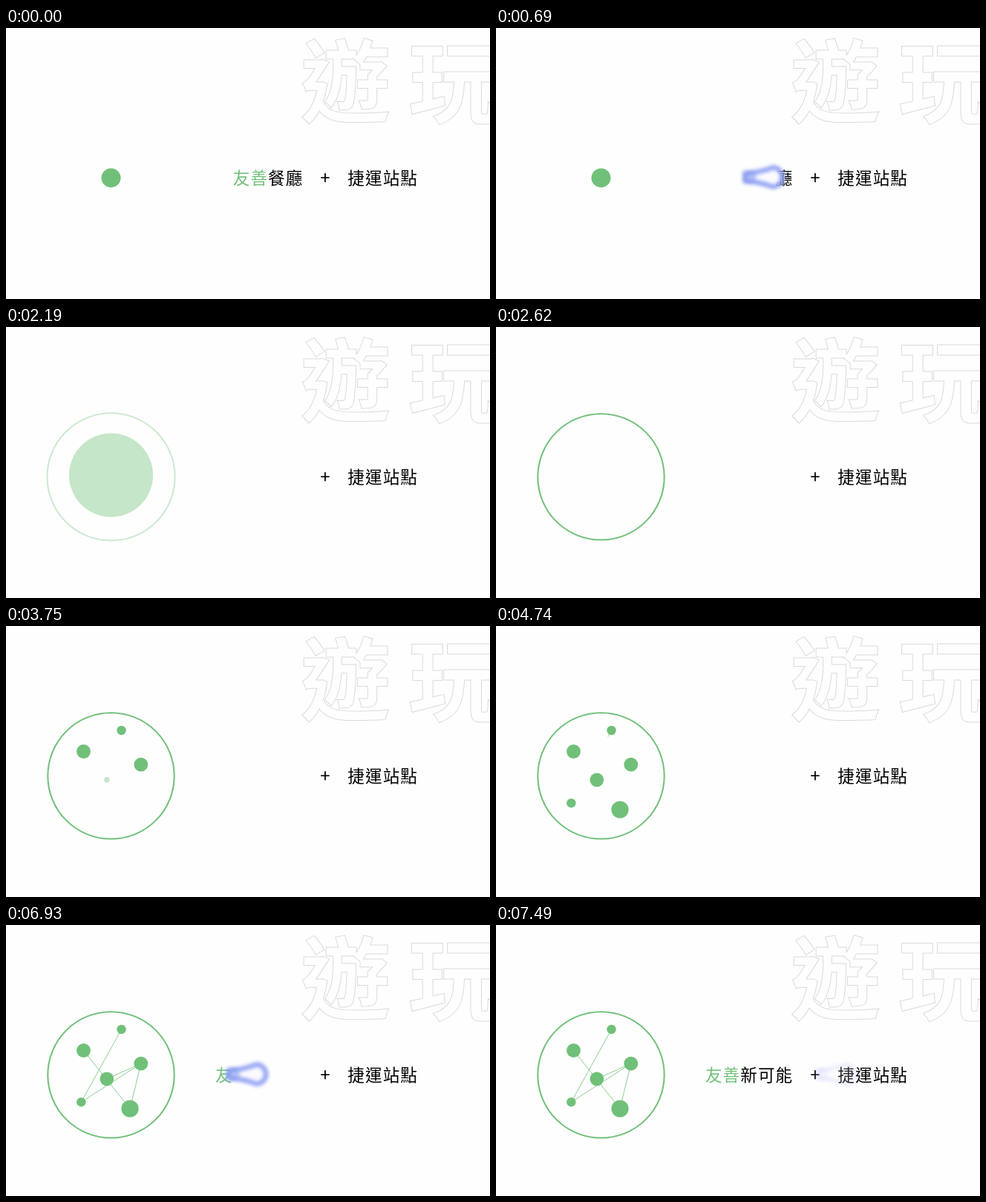
An HTML page with a canvas that plays this animation: 652 by 366 pixels, repeating every 7.59 s.

```html
<!DOCTYPE html>
<html lang="zh-Hant">
<head>
<meta charset="utf-8">
<style>
html, body { margin: 0; width: 100%; height: 100%; overflow: hidden; background: #fefefe; }
canvas { display: block; }
</style>
</head>
<body>
<canvas id="stage" width="652" height="366"></canvas>
<script>
const ctx = document.getElementById('stage').getContext('2d');
const LOOP = 7590;
const GREEN = '#70c079';
const FONT = '"Noto Sans CJK TC", "Noto Sans CJK", "Noto Sans CJK JP", sans-serif';
const CENTER = { x: 141.5, y: 202.4 };

// Dots of the network: position, full radius, entrance start and length
const dots = [
  { x: 155.5, y: 141, r: 6.2, at: 2860, len: 310 },
  { x: 104.5, y: 169.5, r: 9.4, at: 3200, len: 250 },
  { x: 181.8, y: 187.2, r: 9.4, at: 3420, len: 260 },
  { x: 135.8, y: 207.8, r: 9.4, at: 3640, len: 280 },
  { x: 101.3, y: 239.2, r: 6.2, at: 3990, len: 280 },
  { x: 167, y: 248, r: 11.6, at: 4270, len: 290 }
];
const links = [
  { from: 0, to: 4, at: 4720, len: 240 },
  { from: 4, to: 2, at: 5200, len: 190 },
  { from: 1, to: 5, at: 5670, len: 200 },
  { from: 2, to: 5, at: 6160, len: 200 },
  { from: 3, to: 2, at: 6500, len: 200 }
];

const clamp = v => Math.min(1, Math.max(0, v));
const progress = (t, at, len) => clamp((t - at) / len);
const mix = (a, b, u) => a + (b - a) * u;
const smoother = u => u * u * u * (u * (6 * u - 15) + 10);

function disc(x, y, r, alpha = 1) {
  if (r <= 0 || alpha <= 0) return;
  ctx.globalAlpha = alpha;
  ctx.fillStyle = GREEN;
  ctx.beginPath();
  ctx.arc(x, y, r, 0, Math.PI * 2);
  ctx.fill();
  ctx.globalAlpha = 1;
}

function outlineGlyph(char, inkLeft, inkBottom) {
  ctx.font = '900 122px ' + FONT;
  ctx.textAlign = 'left';
  const m = ctx.measureText(char);
  ctx.strokeStyle = '#dadada';
  ctx.lineWidth = 1;
  ctx.miterLimit = 3;
  ctx.strokeText(char, inkLeft + m.actualBoundingBoxLeft, inkBottom - m.actualBoundingBoxDescent);
}

// Evenly spaced characters; the first `greens` of them are green
function label(text, firstCenter, greens = 0) {
  ctx.font = '500 22.5px ' + FONT;
  ctx.textAlign = 'center';
  [...text].forEach((char, i) => {
    ctx.fillStyle = i < greens ? GREEN : '#000';
    ctx.fillText(char, firstCenter + i * 23.65, 211);
  });
}

function clippedLabel(left, right, ...args) {
  if (right <= left) return;
  ctx.save();
  ctx.beginPath();
  ctx.rect(left, 170, right - left, 65);
  ctx.clip();
  label(...args);
  ctx.restore();
}

// Soft blue teardrop travelling along the text
function glow(start, head, alpha) {
  if (alpha <= 0) return;
  const y = 201.5, r = 13;
  const tail = Math.max(start, head - 37);
  const bend = mix(tail, head, 0.5);
  ctx.save();
  ctx.globalAlpha = alpha;
  ctx.filter = 'blur(2px)';
  ctx.beginPath();
  ctx.moveTo(tail, y - 5);
  ctx.quadraticCurveTo(bend, y - 6, head, y - r);
  ctx.arc(head, y, r, -Math.PI / 2, Math.PI / 2);
  ctx.quadraticCurveTo(bend, y + 6, tail, y + 5);
  ctx.closePath();
  ctx.fillStyle = '#fbfbff';
  ctx.fill();
  ctx.strokeStyle = 'rgba(150,168,248,.4)';
  ctx.lineWidth = 9;
  ctx.stroke();
  ctx.strokeStyle = 'rgba(122,142,240,.8)';
  ctx.lineWidth = 4;
  ctx.stroke();
  ctx.fillStyle = 'rgba(130,150,240,.5)';
  ctx.beginPath();
  ctx.ellipse(tail + 6, y, 9, 9, 0, 0, Math.PI * 2);
  ctx.fill();
  ctx.restore();
}

function drawBubble(t) {
  const grow = smoother(progress(t, 930, 1038));
  const shrink = progress(t, 1968, 516);
  disc(CENTER.x, CENTER.y - 5.5 * shrink, mix(13, 99.5, grow) * (1 - shrink),
    clamp(1 - shrink * 1.38));

  const ring = progress(t, 1968, 640);
  if (ring > 0) {
    ctx.globalAlpha = ring;
    ctx.strokeStyle = GREEN;
    ctx.lineWidth = 2;
    ctx.beginPath();
    ctx.arc(CENTER.x, CENTER.y, mix(86.5, 85.2, ring), 0, Math.PI * 2);
    ctx.stroke();
    ctx.globalAlpha = 1;
  }
}

function drawNetwork(t) {
  ctx.strokeStyle = GREEN;
  ctx.lineWidth = 0.8;
  for (const { from, to, at, len } of links) {
    const u = progress(t, at, len);
    if (!u) continue;
    const a = dots[from], b = dots[to];
    ctx.beginPath();
    ctx.moveTo(a.x, a.y);
    ctx.lineTo(mix(a.x, b.x, u), mix(a.y, b.y, u));
    ctx.stroke();
  }
  for (const { x, y, r, at, len } of dots) {
    const u = progress(t, at, len);
    disc(x, y, r * u, u);
  }
}

function drawText(t) {
  label('捷運站點', 471.6);
  ctx.font = '500 24px ' + FONT;
  ctx.fillStyle = '#000';
  ctx.fillText('+', 430, 211);

  if (t < 930) {
    const head = mix(296, 405, progress(t, 170, 740));
    clippedLabel(t < 170 ? 290 : head, 420, '友善餐廳', 317, 2);
    glow(290, head, progress(t, 170, 100) * (1 - progress(t, 800, 110)));
  }
  if (t > 6700) {
    const head = 337 + (t - 6930) * 0.2375;
    clippedLabel(270, head - 32, '友善新可能', 293.2, 2);
    glow(300, head, progress(t, 6740, 100) * (1 - 0.85 * progress(t, 7300, 190)));
  }
}

function render(t) {
  ctx.fillStyle = '#fefefe';
  ctx.fillRect(0, 0, 652, 366);
  outlineGlyph('遊', 398, 131);
  outlineGlyph('玩', 544, 131);
  drawBubble(t);
  drawNetwork(t);
  drawText(t);
}

const began = performance.now();
function tick() {
  render((performance.now() - began) % LOOP);
  requestAnimationFrame(tick);
}
tick();
</script>
</body>
</html>
```
